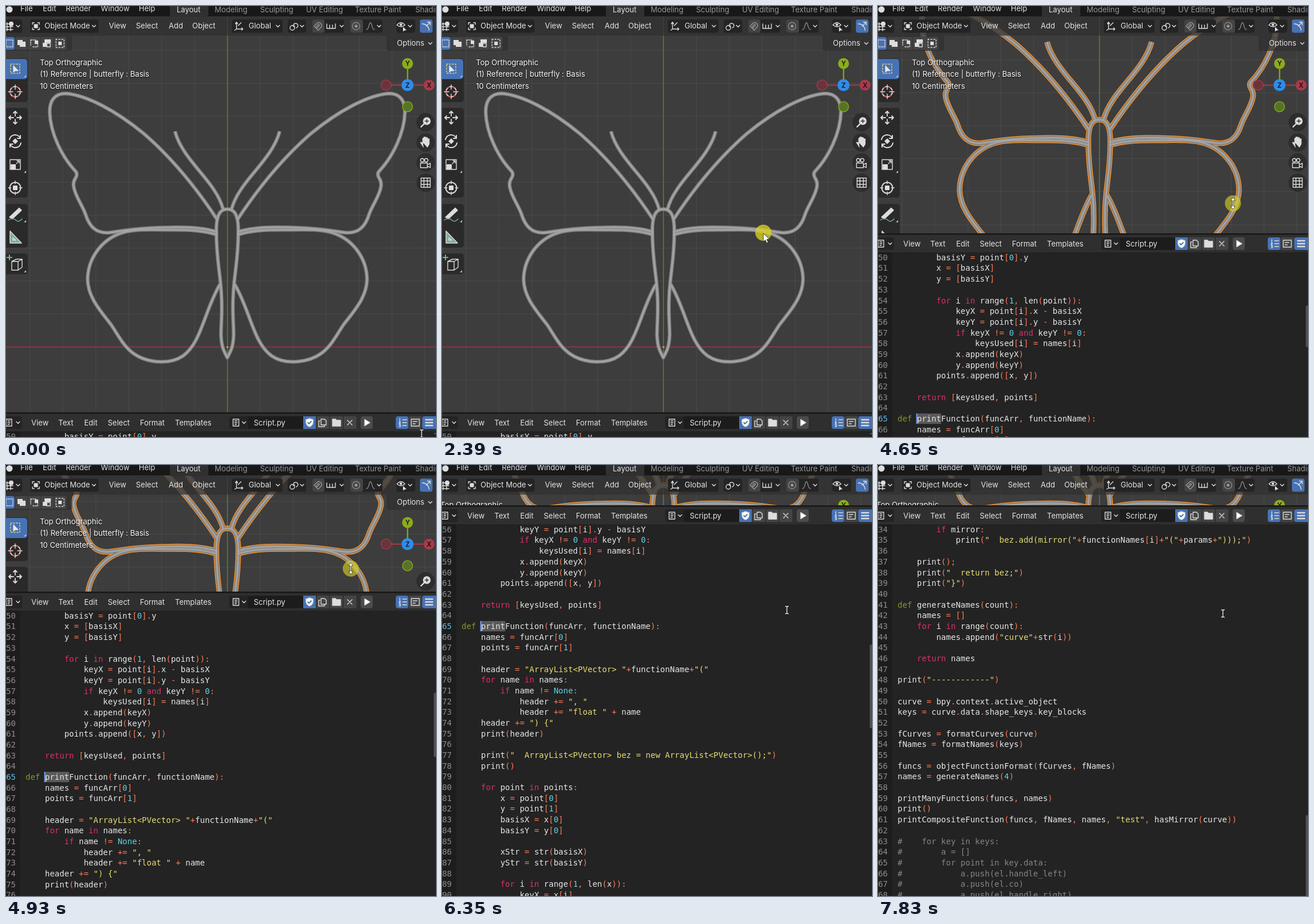
An HTML page that plays this animation: 748 px wide and 749 px high, repeating every 8000 ms.

```html
<!DOCTYPE html>
<html lang="en">
<head>
<meta charset="utf-8">
<title>Curve editor</title>
<style>
html,body{margin:0;width:100%;height:100%;overflow:hidden;background:#181818}
svg{display:block}
text{font:13px Inter,sans-serif;fill:#e4e4e4;white-space:pre}
.dim{fill:#989898}
.over text{fill:#fff;font-size:13.1px;text-shadow:0 1px 2px #000}
.code text{font:14px "DejaVu Sans Mono",monospace;fill:#e6e6e6}
.code .num{fill:#8c8c8c;text-anchor:end}
.code .now{fill:#62b8e6}
.code .c{fill:#858585}.code .s{fill:#e6db74}.code .k{fill:#e02c6d}
.code .d{fill:#84972a}.code .n{fill:#5fd0e6}.code .p{fill:#ff7a55}
.ic{fill:none;stroke:#dcdcdc;stroke-width:1.4;stroke-linecap:round;stroke-linejoin:round}
</style>
</head>
<body>
<svg id="stage" width="100%" height="100%" viewBox="0 0 748 749" preserveAspectRatio="none">
  <defs>
    <g id="wing">
      <path d="M368 372C335 322 293 268 240 222C190 181 140 155 104 152C84 152 76 165 76 184C77 222 98 262 119 285Q126 291 121 299Q116 306 118 315C121 331 132 345 138 361C145 384 157 395 178 394C205 391 225 385 300 384.5C330 384.5 350 387 368 393"/>
      <path d="M368 398C345 390 320 389 290 389C250 389 225 387 202 394C165 406 142 440 142 476C143 508 167 533 183 554C197 575 205 592 222 604C243 619 283 625 308 608C340 585 345 530 372 484"/>
      <path d="M294 218C304 257 344 291 362 320Q373 336 378 354"/>
    </g>
    <path id="body" d="M385 353C373 353 367 362 366 384C365 425 370 450 373 480C378 525 374 545 374 572C375 592 378 598 385 611C392 598 395 592 396 572C396 545 392 525 397 480C400 450 405 425 404 384C403 362 397 353 385 353Z"/>
    <g id="fly" fill="none" stroke-linejoin="round">
      <use href="#wing"/><use href="#wing" transform="translate(770)scale(-1 1)"/><use href="#body"/>
    </g>
  </defs>

  <rect width="748" height="749" fill="#3d3d3d"/>
  <g id="scene">
    <path id="grid" stroke="#4a4a4a" fill="none"/>
    <path d="M0 592.5H748" stroke="#9c3444" stroke-width="1.3"/>
    <path d="M385.3-400V1100" stroke="#5d7e27" stroke-width="1.5"/>
    <use id="glow" href="#fly" stroke="#ed9130" stroke-width="9.6"/>
    <use href="#fly" stroke="#747474" stroke-width="6.6"/>
    <use href="#fly" stroke="#909090" stroke-width="4.8"/>
    <use href="#fly" stroke="#a6a6a6" stroke-width="2.2"/>
    <circle id="origin" cx="385.3" cy="592.7" r="2.2" stroke="#333" stroke-width=".7"/>
  </g>
  <g id="tools"></g>
  <g id="info" class="over"></g>
  <g id="nav"></g>
  <g id="head"></g>
  <g id="row2"></g>
  <g id="editor">
    <rect y="-18" width="748" height="800" fill="#181818"/>
    <rect y="-15.5" width="748" height="31" fill="#2f2f2f"/>
    <rect y="15" width="748" height="760" fill="#232323"/>
    <rect y="15" width="25" height="760" fill="#1d1d1d"/>
    <g id="bar"></g>
    <svg class="code" y="15" width="744" height="740" overflow="hidden"><g id="code"></g></svg>
    <rect id="thumb" x="744" width="6" rx="2" fill="#505050"/>
  </g>
  <circle id="halo" r="14" fill="#d9d222"/>
  <g id="pointer">
    <path d="M0 0V14.5L3.4 11.4L5.8 17L8.3 16L6 10.4H10.6Z" fill="#fff" stroke="#222" stroke-width=".8"/>
    <path d="M0-10L-4-5H-1V5H-4L0 10L4 5H1V-5H4Z" fill="#fff" stroke="#222" stroke-width=".7"/>
    <path d="M-3-6.5Q0-6.5 0-5Q0-6.5 3-6.5M0-5V5M-3 6.5Q0 6.5 0 5Q0 6.5 3 6.5" fill="none" stroke="#eee" stroke-width="1.3"/>
  </g>
</svg>

<script id="listing" type="text/plain">
        basisY = point[0].y
        x = [basisX]
        y = [basisY]

        for i in range(1, len(point)):
            keyX = point[i].x - basisX
            keyY = point[i].y - basisY
            if keyX != 0 and keyY != 0:
                keysUsed[i] = names[i]
            x.append(keyX)
            y.append(keyY)
        points.append([x, y])

    return [keysUsed, points]

def printFunction(funcArr, functionName):
    names = funcArr[0]
    points = funcArr[1]

    header = "ArrayList<PVector> "+functionName+"("
    for name in names:
        if name != None:
            header += ", "
            header += "float " + name
    header += ") {"
    print(header)

    print("  ArrayList<PVector> bez = new ArrayList<PVector>();")
    print()

    for point in points:
        x = point[0]
        y = point[1]
        basisX = x[0]
        basisY = y[0]

        xStr = str(basisX)
        yStr = str(basisY)

        for i in range(1, len(x)):
            keyX = x[i]
            keyY = y[i]
            if keyX != 0:
                xStr += " + "+keys[i].name+"*"+str(keyX)
            if keyY != 0:
                yStr += " + "+keys[i].name+"*"+str(keyY)
        print("  bez.add(new PVector("+xStr+","+yStr+"));")
    print();
    print("  return bez;")
    print("}")

def objectFunctionFormat(curves, keyNames):
    funcs = []
    for curve in curves:
        funcs.append(curveFunctionFormat(curve, keyNames))

    return funcs

def printManyFunctions(funcs, functionNames):
    for i in range(len(funcs)):
        printFunction(funcs[i], functionNames[i])
        print()

def printCompositeFunction(funcs, keyNames, functionNames, functionName, mirror=False):
    header = "ArrayList<ArrayList<PVector>> "+functionName+"("
    for key in keyNames:
        continue
        header += ", "
        header += "float " + key
    header += ") {"
    print(header)
    print("  ArrayList<ArrayList<PVector>> bez = new ArrayList<ArrayList<PVector>>();")
    print()

    for i in range(len(functionNames)):
        params = ""

        for key in keyNames:
            if params != "":
                params += ", "
            params += key

        print("  bez.add("+functionNames[i]+"("+params+"));")

        if mirror:
            print("  bez.add(mirror("+functionNames[i]+"("+params+")));")

    print();
    print("  return bez;")
    print("}")

def generateNames(count):
    names = []
    for i in range(count):
        names.append("curve"+str(i))

    return names

print("------------")

curve = bpy.context.active_object
keys = curve.data.shape_keys.key_blocks

fCurves = formatCurves(curve)
fNames = formatNames(keys)

funcs = objectFunctionFormat(fCurves, fNames)
names = generateNames(4)

printManyFunctions(funcs, names)
print()
printCompositeFunction(funcs, fNames, names, "test", hasMirror(curve))

#    for key in keys:
#        a = []
#        for point in key.data:
#            a.push(el.handle_left)
#            a.push(el.co)
#            a.push(el.handle_right)
</script>

<script>
const $ = id => document.getElementById(id);
const label = (x, y, s, cls = '') => `<text class="${cls}" x="${x}" y="${y + 4.7}">${s}</text>`;
const box = (x, y, w, h, fill, r = 4) => `<rect x="${x}" y="${y}" width="${w}" height="${h}" rx="${r}" fill="${fill}"/>`;
const icon = (x, y, d, style = '') => `<path class="ic" transform="translate(${x} ${y})" d="${d}" style="${style}"/>`;
const chev = (x, y) => icon(x, y, 'M-3-1.5L0 1.5L3-1.5');
const dot = (x, y, r, fill, stroke = 'none') => `<circle cx="${x}" cy="${y}" r="${r}" fill="${fill}" stroke="${stroke}" stroke-width="1.3"/>`;
const ring = r => `M${-r} 0a${r} ${r} 0 1 0 ${2 * r} 0a${r} ${r} 0 1 0 ${-2 * r} 0`;
const BLUE = '#4772b3', DARK = '#242424', GRAY = '#444';
const PAGE = 'M-5-6H5V6H-5ZM-2-3H2M-2 0H2M-2 3H1';
const LINES = 'M-6-5H6M-6 0H6M-6 5H6';

function drawGrid() {
  let d = '';
  for (let i = -7; i < 8; i++) d += `M${385.3 + i * 57.25}-100V1100`;
  for (let i = -11; i < 9; i++) d += `M0 ${592.5 + i * 57.25}H748`;
  $('grid').setAttribute('d', d);
}

function drawTools() {
  let s = '';
  [[91, 76], [177, 156], [344, 76], [430, 36]].forEach(([y, h]) => s += box(-8, y, 46, h, '#2a2a2a', 5));
  s += box(-8, 92, 45, 35, BLUE, 5);
  [109, 275, 361, 448].forEach(y => s += icon(35, y + 15, 'M0-4V0H-4Z', 'fill:#bbb;stroke:none'));
  s += icon(16, 109, 'M-8-8H8V8H-8Z', 'stroke:#e8dc80;stroke-dasharray:2 3');
  s += icon(16, 109, 'M-3-5V6L0 3.5H5Z', 'fill:#eee');
  s += icon(16, 149, ring(9), 'stroke-width:2') + icon(16, 149, ring(9), 'stroke:#d44;stroke-width:2;stroke-dasharray:4 5;stroke-linecap:butt');
  s += icon(16, 149, 'M-12 0H-4M4 0H12M0-12V-4M0 4V12');
  s += icon(16, 194, 'M-11 0H-3M3 0H11M0-11V-3M0 3V11M-8-3L-11 0L-8 3M8-3L11 0L8 3M-3-8L0-11L3-8M-3 8L0 11L3 8', 'stroke-width:1.8');
  s += icon(16, 235, 'M-10-3A10 10 0 0 1 9-5M10 3A10 10 0 0 1-9 5M9-10V-5H4M-9 10V5H-4', 'stroke-width:2') + icon(16, 235, 'M0-4L4 0L0 4L-4 0Z', 'fill:#ddd');
  s += icon(16, 275, 'M-9-8H9V9H-9ZM2-1L7-6M3-6H7V-2') + box(8, 275, 9, 9, '#ddd', 1);
  s += icon(16, 316, ring(9.5), 'stroke-width:2') + box(12, 312, 8, 8, '#ddd', 1) + icon(16, 316, 'M0-12V-7M0 7V12M-12 0H-7M7 0H12');
  s += icon(16, 361, 'M-10 6L7-10L11-6L-5 9Z', 'fill:#ddd') + icon(16, 361, 'M-12 11Q-4 6 1 11T12 9', 'stroke:#7fae98');
  s += icon(16, 402, 'M-9-11V10H11ZM-4 1V5H1Z', 'fill:#7fae98');
  s += icon(18, 448, 'M-8-4L0-8H10V6L3 11H-8ZM-8-4H3V11M3-4L10-8');
  s += icon(6, 437, 'M-4 0H4M0-4V4', 'stroke:#6cc080;stroke-width:2');
  $('tools').innerHTML = s;
}

function drawOverlay() {
  $('info').innerHTML = label(59, 98, 'Top Orthographic')
    + label(59, 118.5, '(1) Reference | butterfly : Basis') + label(59, 139, '10 Centimeters');
  let s = '<path d="M698.5 138V100" stroke="#8bac1c" stroke-width="2.2"/><path d="M661 137.5H736" stroke="#a83a4b" stroke-width="2.2"/>';
  s += dot(661, 137.5, 8.8, '#6a343d', '#a83a4b') + dot(698.5, 175, 8.8, '#567428', '#8bac1c');
  s += dot(698.5, 100, 9.5, '#8bac1c') + dot(736, 137.5, 9.5, '#a83a4b') + dot(698.5, 137.5, 10.5, '#2f8cea');
  [['Y', 698.5, 100], ['X', 736, 137.5], ['Z', 698.5, 137.5]].forEach(([c, x, y]) =>
    s += `<text x="${x}" y="${y + 4}" text-anchor="middle" style="font-size:11.5px;font-weight:600;fill:#151515">${c}</text>`);
  [202, 237, 272, 307].forEach(y => s += dot(730, y, 16, '#2b2b2be0'));
  s += icon(732, 200, ring(6), 'fill:#ddd') + icon(732, 200, 'M-4 4L-10 10', 'stroke-width:2.4') + icon(732, 200, 'M-3 0H3M0-3V3', 'stroke:#2b2b2b');
  s += icon(730, 237, 'M-4 8L-9 0L-5 1V-6M-5-1V-7H-3V-1V-9H0V-1V-8H3V0V-6H6V3L3 8Z', 'fill:#ddd');
  s += icon(729, 273, 'M-8 0H4V8H-8ZM4 3L9 0V8L4 5M-8-5a3 3 0 1 0 6 0a3 3 0 1 0-6 0M-1-5a3 3 0 1 0 6 0a3 3 0 1 0-6 0');
  s += icon(730, 307, 'M-8-8H8V8H-8ZM-8-3H8M-8 3H8M-3-8V8M3-8V8');
  $('nav').innerHTML = s;
}

function drawHead() {
  let s = box(0, 0, 748, 18, '#181818', 0) + box(0, 18, 748, 33.5, '#303030b8', 0);
  s += box(285, -8, 67, 27, '#303030') + dot(6, 6, 5.5, '#ddd');
  [[25, 'File'], [64, 'Edit'], [104, 'Render'], [165, 'Window'], [231, 'Help']].forEach(a => s += label(a[0], 4, a[1]));
  s += label(297, 6.5, 'Layout');
  [[363, 'Modeling'], [442, 'Sculpting'], [522, 'UV Editing'], [607, 'Texture Paint'], [712, 'Shading']]
    .forEach(a => s += label(a[0], 6.5, a[1], 'dim'));
  [[-8, 36], [42, 119], [393, 88], [490, 32], [533, 55], [599, 56], [679, 33]].forEach(([x, w]) => s += box(x, 23.5, w, 23, DARK));
  s += box(720, 23.5, 22, 23, BLUE) + box(533, 23.5, 21, 23, GRAY) + box(599, 23.5, 22, 23, GRAY);
  s += icon(6, 35, 'M-6-4H6M-6 1H6M-6 6H6M-4-6V8M2-6V8') + dot(9, 31, 4, '#ddd');
  s += icon(52, 35, 'M-6-3V-6H-3M3-6H6V-3M6 3V6H3M-3 6H-6V3') + box(48.5, 31.5, 7, 7, '#ddd', 1);
  [[67, 'Object Mode'], [179, 'View'], [226, 'Select'], [283, 'Add'], [324, 'Object'], [422, 'Global']].forEach(a => s += label(a[0], 34.5, a[1]));
  [21, 153, 473, 515, 584, 649, 703].forEach(x => s += chev(x, 35));
  s += icon(405, 35, 'M-4-6V5H7M-4 5L-7 7M-6-4L-4-7L-2-4M5 3L7 5L5 7M-1-1L4-6');
  s += icon(501, 35, 'M-7 3a4 4 0 1 0 8 0a4 4 0 1 0-8 0M-1-2a4 4 0 1 1 5 5') + dot(501, 35, 1.5, '#ddd');
  s += icon(543, 35, 'M-7 0L-2-5A5 5 0 0 1 5 2L0 7L-3 4L2-1Q2-4-1-2L-4 3Z', 'stroke:#999');
  s += icon(566, 35, 'M-8-4V4M-3-2V4M2-2V4M7-4V4M-8 4H7');
  s += icon(609, 35, ring(6.5), 'stroke:#888') + dot(609, 35, 2.5, '#999');
  s += icon(634, 35, 'M-7 6C-2 6-3-6 0-6S2 6 7 6', 'stroke:#888');
  s += icon(687, 33, 'M-7 0Q0-8 7 0Q0 6-7 0Z') + dot(687, 32.5, 2.2, '#ddd');
  s += icon(691, 37, 'M0 0V7L2.5 5H5Z', 'fill:#fff;stroke-width:.6');
  s += icon(731, 35, 'M-7-4Q3-4 5 7M7-7L0 0M2-7H7V-2');
  $('head').innerHTML = s;

  s = '<path d="M0 51.5H115V74Q115 78 111 78H0ZM662 51.5H748V78H666Q662 78 662 74Z" fill="#303030b8"/>';
  s += box(-8, 54, 23, 22, BLUE);
  [16, 38.5, 61, 83.5].forEach(x => s += box(x, 54, 21.5, 22, GRAY, 1));
  s += icon(6, 65, 'M-6-6H6V6H-6Z', 'stroke-dasharray:2 2');
  s += box(20, 59, 9, 9, '#ddd', 0) + box(24, 62, 10, 9, '#ddd', 0);
  s += icon(49, 65, 'M-6-6H3M-6-6V3M-2 6H6V-2', 'stroke-dasharray:2 2') + box(50, 60, 6, 6, '#ddd', 0);
  s += box(67, 58, 11, 6, '#ddd', 0) + box(64, 64, 7, 7, '#ddd', 0) + icon(73, 67, 'M-2-2H4V4H-2Z');
  s += icon(94, 65, 'M-7-7H7V7H-7Z', 'stroke-dasharray:2 3') + box(91, 62, 6, 6, '#ddd', 0);
  s += label(680, 64.5, 'Options') + chev(738, 65);
  $('row2').innerHTML = s;
}

function drawBar() {
  let s = box(-8, -11, 36, 22, DARK) + icon(5, 0, PAGE) + chev(21, 0);
  [[44, 'View'], [91, 'Text'], [136, 'Edit'], [177, 'Select'], [233, 'Format'], [294, 'Templates']].forEach(a => s += label(a[0], 0, a[1]));
  s += box(388, -11, 221, 22, DARK) + box(421, -11, 96, 22, '#1c1c1c', 0);
  [540, 563.5, 587].forEach(x => s += box(x, -11, 22.5, 22, GRAY, 1));
  s += icon(400, 0, PAGE) + chev(414, 0) + label(431, 0, 'Script.py');
  s += box(517, -11, 22, 22, BLUE, 0) + icon(528, 0, 'M0-7L6-5V0Q5 5 0 7Q-5 5-6 0V-5Z', 'fill:#fff') + icon(528, 0, 'M-3 0L-1 2L3-2', `stroke:${BLUE};stroke-width:1.8`);
  s += icon(551, 0, 'M-3-6H3L6-3V4H-3ZM-5-3H-7V7H3V5') + icon(575, 0, 'M-7-6H-2L0-4H7V6H-7Z', 'fill:#ddd') + icon(598, 0, 'M-4-4L4 4M4-4L-4 4');
  s += box(617, -11, 21, 22, '#4b4b4b') + icon(628, 0, 'M-4-5.5L5 0L-4 5.5Z', 'fill:#fff');
  s += box(678, -11, 22, 22, BLUE) + box(701, -11, 22, 22, GRAY, 0) + box(724, -11, 26, 22, BLUE);
  s += icon(691, 0, 'M-1-5H6M-1 0H6M-1 5H6M-6-7V-3M-7-1H-5L-7 2H-5M-7 4H-5V7H-7') + icon(712, 0, 'M-7-6H7V6H-7ZM-4-2H3M-4 2H0') + icon(736, 0, LINES, 'stroke-width:2.4');
  $('bar').innerHTML = s;
}

const FIRST = 50, PITCH = 18.68, CHAR = 8.428;
const TOKEN = /(#.*)|("[^"]*")|\b(for|in|if|and|return|continue)\b|\b(def)\b|\b(None|False|\d+)\b|([^\w\s]+?)/g;
const esc = s => s.replace(/&/g, '&amp;').replace(/</g, '&lt;');
const paint = line => {
  let out = '', at = 0;
  for (const m of line.matchAll(TOKEN)) {
    const kind = 'cskdnp'[m.slice(1).findIndex(Boolean)];
    out += esc(line.slice(at, m.index)) + `<tspan class="${kind}">${esc(m[0])}</tspan>`;
    at = m.index + m[0].length;
  }
  return out + esc(line.slice(at));
};

function drawCode() {
  const rows = $('listing').textContent.replace(/^\n/, '').trimEnd().split('\n');
  const mark = 15 * PITCH;
  let s = box(34 + 4 * CHAR, mark, 5 * CHAR, 18, '#5a5a5a', 0) + box(66.5, mark, 2, 18, '#71a8ff', 0);
  rows.forEach((row, i) => {
    const y = 13.8 + i * PITCH, n = FIRST + i;
    s += `<text class="num ${n === 65 ? 'now' : ''}" x="17" y="${y}">${n}</text><text x="34" y="${y}">${paint(row)}</text>`;
  });
  $('code').innerHTML = s;
}

// number of steps done at time t, out of n spread from a to b
const steps = (t, a, b, n) => t < a ? 0 : Math.min(n, Math.floor((t - a) / (b - a) * (n - 1) + .125) + 1);

const along = (pts, p) => {
  const f = p * (pts.length - 1), i = Math.min(pts.length - 2, Math.floor(f)), u = f - i;
  return [0, 1].map(j => pts[i][j] + (pts[i + 1][j] - pts[i][j]) * u);
};

const MOVES = [
  [1080, 1840, 12, [[723, 743], [735, 690], [690, 560], [610, 430], [569, 395]]],
  [2050, 2190, 3, [[569, 395], [559, 395]]],
  [2930, 3620, 10, [[559, 395], [640, 500], [715, 610], [722, 690], [658, 707]]],
  [5730, 5870, 3, [[568, 66], [582, 130], [600, 243]]]
];
const DRAG = [707, 689, 659, 622, 580, 535, 490, 445, 397, 343, 300, 262, 222, 180, 142, 110, 87, 78, 74, 71, 68, 66];
const SCROLL = [[6350, 6620, 5, 6], [6890, 6970, 2, 6], [7300, 7430, 3, 8], [7760, 7830, 2, 9]];
const CLICK = [0, .78, .7, .5, .25, 0];
const ARROW = 0, RESIZE = 1, BEAM = 2;

function pointerAt(t, drag) {
  if (t >= 6350) return [600, t < 7300 ? 252 : 258];
  if (drag && t < 5730) return [Math.max(568, 657 - 4.4 * (drag - 1)), DRAG[drag - 1]];
  let pos = MOVES[0][3][0];
  for (const [a, b, n, pts] of MOVES) if (t >= a) pos = along(pts, steps(t, a, b, n) / n);
  return pos;
}

function draw(t) {
  const drag = steps(t, 3950, 4720, 11) + steps(t, 4790, 5470, 11);
  const top = drag < 2 ? 724 : Math.max(88, DRAG[drag - 2] + 16);
  const click = steps(t, 2390, 2650, 5);
  const first = SCROLL.reduce((sum, [a, b, n, size]) => sum + steps(t, a, b, n) * size, FIRST);
  const small = top < 95;

  $('scene').setAttribute('transform', `translate(0 ${(top - 724) / 2})`);
  $('glow').style.display = click > 1 ? '' : 'none';
  $('origin').setAttribute('fill', click > 1 ? '#f59a30' : '#b8b030');
  $('tools').style.display = $('row2').style.display = small ? 'none' : '';
  $('info').setAttribute('transform', small ? 'translate(-62 -29)' : '');
  $('nav').setAttribute('transform', small ? 'translate(0 -30)' : '');

  $('editor').setAttribute('transform', `translate(0 ${top})`);
  $('code').setAttribute('transform', `translate(0 ${(FIRST - first) * PITCH})`);
  const room = 734 - top;
  $('thumb').setAttribute('y', 15 + room * (first - 1) / 170);
  $('thumb').setAttribute('height', Math.max(0, room * .225));

  const [x, y] = pointerAt(t, drag);
  const shape = t < 1080 || steps(t, 5730, 5870, 3) > 1 ? BEAM : t >= 3600 && t < 5730 ? RESIZE : ARROW;
  $('pointer').setAttribute('transform', `translate(${x} ${y})`);
  [...$('pointer').children].forEach((el, i) => el.style.display = i === shape ? '' : 'none');
  $('halo').setAttribute('transform', `translate(${x} ${y - (shape === ARROW ? 1 : 0)})`);
  $('halo').setAttribute('opacity', drag ? (drag < 20 ? .62 : [.45, .22, 0][drag - 20]) : CLICK[click]);
}

drawGrid(); drawTools(); drawOverlay(); drawHead(); drawBar(); drawCode();
(function frame() {
  draw(performance.now() % 8000);
  requestAnimationFrame(frame);
})();
</script>
</body>
</html>
```
